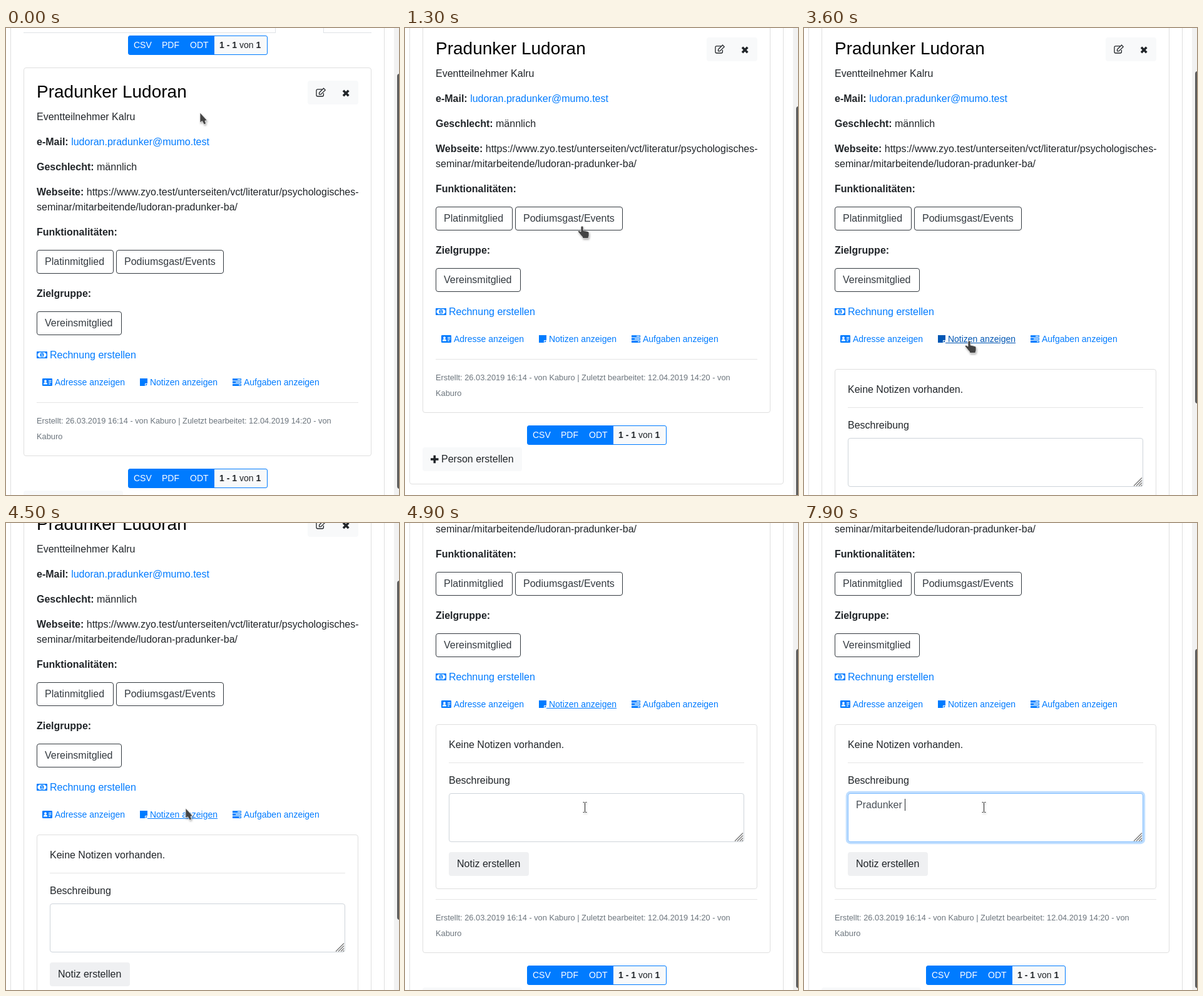
An HTML page that plays this animation: 628 by 745 pixels, repeating every 8 s.

```html
<!DOCTYPE html>
<html lang="de">
<head>
<meta charset="utf-8">
<title>Notiz erstellen</title>
<style>
html, body { margin: 0; width: 100%; height: 100%; overflow: hidden; background: #fff; }
#stage { position: absolute; left: 0; top: 0; width: 628px; height: 745px; overflow: hidden;
  font: 16px/24px "Liberation Sans", Arial, sans-serif; color: #212529; }
#stage div { position: absolute; box-sizing: border-box; }
svg { position: absolute; left: 0; top: 0; width: 1px; height: 1px; overflow: visible; }
.t { white-space: pre; }
.h { font-size: 28px; line-height: 33px; color: #000; }
.s { font-size: 14px; line-height: 21px; }
.a { color: #007bff; }
.w { color: #fff; }
.m { color: #6c757d; }
.m small { font-size: 12.8px; }
.card { border: 1px solid #dfdfdf; border-radius: 4px; }
.line { background: #e5e5e5; }
.tab { background: #dee2e6; }
.btn { border: 1px solid #343a40; border-radius: 4px; color: #343a40; padding: 6px 12px; white-space: pre; }
.light { background: #f8f9fa; border-radius: 4px; }
.grey { background: #eff0f2; border-radius: 4px; }
.pill { border: 1px solid #007bff; border-radius: 3px; background: linear-gradient(90deg, #007bff 137px, #f8f9fa 137px); }
#clip { overflow: hidden; left: 49px; top: 597px; width: 514px; }
#field { border: 1px solid #ced4da; border-radius: 4px; background: #fff; }
#typed { color: #495057; }
#caret { width: 1px; height: 19px; background: #212529; }
#track { left: 620px; top: 0; width: 8px; height: 745px; background: #f1f1f1; }
#thumb { left: 625px; width: 8px; border-radius: 4px; background: #5c5c5c; }
#pointer { filter: drop-shadow(1px 2px 1.5px rgba(0,0,0,.3)); }
</style>
</head>
<body>
<div id="stage"></div>
<script>
const $ = id => document.getElementById(id);
const box = (x, y, w, h, cls, id = '', inner = '') =>
  `<div id="${id}" class="${cls}" style="left:${x}px;top:${y}px;width:${w}px;height:${h}px">${inner}</div>`;
const text = (x, y, str, cls = '', id = '') =>
  `<div id="${id}" class="t ${cls}" style="left:${x}px;top:${y}px">${str}</div>`;

const pager = y => box(195, y, 223, 31, 'pill') +
  text(204, y + 5, 'CSV', 's w') + text(249, y + 5, 'PDF', 's w') + text(294, y + 5, 'ODT', 's w') +
  text(341, y + 5, '<b>1 - 1</b> von <b>1</b>', 's');

const bar = (y, x) => `<path d="M362 ${y}h14v3.2h-14z"/><path fill="#fff" d="M${x} ${y + 1}h${375 - x}v1.2h-${375 - x}z"/>`;

const icons = `<svg fill="#007bff">
<g fill="#f8f9fa" stroke="#212529" stroke-width="1.3">
<path d="M505 97.8h-7a2 2 0 0 0-2 2v7.2a2 2 0 0 0 2 2h7.4a2 2 0 0 0 2-2v-3"/>
<path d="M500.5 105.8v-2.6l7-7 2.7 2.7-7 7z"/>
<path stroke-width="3.6" d="M539 99.8l8.4 8.4M547.4 99.8l-8.4 8.4"/></g>
<rect x="49" y="516" width="17" height="11" rx=".8"/>
<path fill="#fff" d="M52.5 517.4h10a2 2 0 0 0 2 2v4.2a2 2 0 0 0-2 2h-10a2 2 0 0 0-2-2v-4.2a2 2 0 0 0 2-2z"/>
<ellipse cx="57.5" cy="521.5" rx="2.9" ry="3.6"/>
<path fill="none" stroke="#fff" d="M56.3 520.2l1.4-.8v4M56.2 523.6h2.8"/>
<rect x="58" y="559" width="16" height="12" rx="1.3"/>
<g fill="#fff"><circle cx="63" cy="563.2" r="1.9"/><path d="M59.8 568.6c0-2.6 1.2-3.4 3.2-3.4s3.2.8 3.2 3.4z"/>
<path d="M68 562h4.5v1.2h-4.5zM68 564.6h4.5v1.2h-4.5zM68 567.2h3v1.2h-3z"/></g>
<path id="note" d="M214 559h12v8h-4v4h-8zM223 568h3l-3 3z"/>
${bar(559.2, 370)}${bar(563.5, 367)}${bar(567.8, 372)}</svg>`;

const url = 'https://www.zyo.test/unterseiten/vct/literatur/psychologisches-';

const panel = box(0, 0, 514, 263, 'card', 'panel',
  text(20, 20, 'Keine Notizen vorhanden.') +
  box(20, 60, 472, 1, 'line') +
  text(20, 77, 'Beschreibung') +
  box(20, 109, 472, 78, '', 'field',
    text(12, 6, '', '', 'typed') + box(12, 8, 1, 19, '', 'caret') +
    '<svg fill="none" stroke="#777" stroke-width="1.3"><path d="M456 75.5l13-13M460 75.5l9-9M464 75.5l5-5M467.500 75.500l1.500-1.500"/></svg>') +
  box(20, 203, 128, 38, 'grey', '', text(13, 7, 'Notiz erstellen')));

$('stage').innerHTML = `<div id="page">` +
  box(7, -200, 598, 997, 'card', 'outer') +
  box(28, 7, 403, 1, 'tab') + box(507, 7, 77, 1, 'tab') +
  box(430, -40, 1, 47, 'tab') + box(507, -40, 1, 47, 'tab') +
  pager(12) +
  box(28, 63, 556, 620, 'card', 'card') +
  box(482, 84, 81, 38, 'light') +
  text(49, 85, 'Pradunker Ludoran', 'h') +
  text(49, 130, 'Eventteilnehmer Kalru') +
  text(49, 170, '<b>e-Mail:</b> <span class="a">ludoran.pradunker@mumo.test</span>') +
  text(49, 210, '<b>Geschlecht:</b> männlich') +
  text(49, 250, `<b>Webseite:</b> ${url}\nseminar/mitarbeitende/ludoran-pradunker-ba/`) +
  text(49, 314, '<b>Funktionalitäten:</b>') +
  box(49, 354, 123, 38, 'btn', '', 'Platinmitglied') +
  box(176, 354, 172, 38, 'btn', '', 'Podiumsgast/Events') +
  text(49, 412, '<b>Zielgruppe:</b>') +
  box(49, 452, 136, 38, 'btn', '', 'Vereinsmitglied') +
  text(70, 510, 'Rechnung erstellen', 'a') +
  text(78, 555, 'Adresse anzeigen', 's a') +
  text(226, 555, ' Notizen anzeigen', 's a', 'link') +
  text(380, 555, 'Aufgaben anzeigen', 's a') +
  icons +
  `<div id="clip">${panel}</div><div id="low">` +
  box(49, 597, 514, 1, 'line') +
  text(49, 614, '<small>Erstellt: 26.03.2019 16:14 - von Kaburo | Zuletzt bearbeitet: 12.04.2019 14:20 - von</small>\n<small>Kaburo</small>', 'm') +
  pager(703) +
  box(28, 738, 159, 38, 'light', '', text(30, 7, 'Person erstellen')) +
  `<svg fill="#212529"><path d="M41 755.300h4.500v-4.500h3.500v4.500h4.500v3.500h-4.500v4.500h-3.500v-4.500h-4.500z"/></svg>
  </div></div><div id="track"></div><div id="thumb"></div>
  <svg id="pointer"><g id="spot">
  <path id="arrow" fill="#444" stroke="#fff" stroke-width=".7" d="M0 0V16L3.500 13.500 6.500 19 9.500 17.500 8 13 11.500 12.500z"/>
  <path id="hand" fill="#444" stroke="#fff" stroke-width=".7" d="M0 0c1.200 0 2 1 2 2v5l6 1.300c2 .4 3 1.500 3 3.200v3c0 2-1 2.500-1 5h-9c0-2-1.500-3.500-3-5l-4.500-5.500c-.7-1.200 1-2.500 2.500-1.500l2 1.500v-7c0-1 .8-2 2-2z"/>
  <path id="beam" fill="none" stroke="#333" d="M-3-8h2l1 1 1-1h2M0-7V7M-3 8h2l1-1 1 1h2"/>
  </g></svg>`;

const scrollKeys = [[400, 0], [500, 5], [600, 20], [700, 39], [800, 55], [900, 65], [1000, 69],
  [4300, 69], [4400, 78], [4500, 100], [4600, 138], [4700, 181], [4800, 242], [4900, 276]];
const moves = [[600, 1000, -19, 120], [1100, 1300, -8, 61], [1800, 2500, -19, 183], [3800, 4300, 23, -44], [4800, 4900, 1, -1]];
const keyTimes = [6500, 6700, 6800, 7000, 7100, 7300, 7500, 7700, 7800, 7900];

const clamp = u => Math.max(0, Math.min(1, u));
const smooth = u => u * u * (3 - 2 * u);

function lerpKeys(keys, t) {
  let [t0, v0] = keys[0];
  for (const [t1, v1] of keys) {
    if (t < t1) return t1 === t0 ? v0 : v0 + (v1 - v0) * clamp((t - t0) / (t1 - t0));
    [t0, v0] = [t1, v1];
  }
  return v0;
}

// cubic-bezier(.25, .1, .25, 1)
function ease(u) {
  let lo = 0, hi = 1;
  for (let i = 0; i < 20; i++) {
    const p = (lo + hi) / 2, q = 1 - p;
    if (.75 * p * q * q + .75 * p * p * q + p ** 3 < u) lo = p; else hi = p;
  }
  return .3 * lo * (1 - lo) ** 2 + 3 * lo * lo * (1 - lo) + lo ** 3;
}

function opening(t) {
  if (t < 3300) return { height: 0, inset: 0, extra: 0 };
  if (t >= 3700) return { height: 263, inset: 0, extra: 279 };
  const height = Math.round(295 * ease(clamp((t - 3270) / 350)));
  return { height, inset: 16, extra: height + 16 };
}

function draw(time) {
  const t = Math.floor(time / 100) * 100;
  const scroll = Math.round(lerpKeys(scrollKeys, t));
  const { height, inset, extra } = opening(t);
  $('page').style.transform = `translateY(${-scroll}px)`;
  $('low').style.transform = `translateY(${extra}px)`;
  $('outer').style.height = 997 + extra + 'px';
  $('card').style.height = 620 + extra + 'px';
  $('clip').style.height = height + 'px';
  $('panel').style.top = inset + 'px';

  const doc = 1247 + extra;
  $('thumb').style.top = Math.round(940 / doc * (308 + scroll) - 159) + 'px';
  $('thumb').style.height = Math.round(825514 / doc) + 'px';

  const hover = t >= 2400 && t < 4000;
  const color = hover ? '#0056b3' : '#007bff';
  $('link').style.color = color;
  $('note').style.fill = color;
  $('link').style.textDecoration = hover || (t >= 3300 && t < 5500) ? 'underline' : 'none';

  const focus = t < 5500 ? 0 : t < 5600 ? .5 : 1;
  $('field').style.borderColor = ['#ced4da', '#a7c9ed', '#80bdff'][focus * 2];
  $('field').style.boxShadow = `0 0 0 ${3.2 * focus}px rgba(0,123,255,${.25 * focus})`;
  $('typed').textContent = 'Pradunker '.slice(0, keyTimes.filter(k => k <= t).length);
  $('caret').style.left = 12 + Math.round($('typed').getBoundingClientRect().width) + 'px';
  $('caret').style.visibility = focus ? 'visible' : 'hidden';

  let x = 310, y = 135;
  for (const [a, b, dx, dy] of moves) {
    const u = smooth(clamp((t - a) / (b - a)));
    x += dx * u;
    y += dy * u;
  }
  const shape = t >= 4900 ? 'beam' : hover || (t >= 1200 && t < 1900) ? 'hand' : 'arrow';
  for (const id of ['arrow', 'hand', 'beam']) $(id).style.display = id === shape ? '' : 'none';
  const half = shape === 'beam' ? .5 : 0;
  $('spot').setAttribute('transform', `translate(${Math.round(x) - half} ${Math.round(y) - half})`);
}

const start = performance.now();
function tick() {
  draw((performance.now() - start) % 8000);
  requestAnimationFrame(tick);
}
tick();
</script>
</body>
</html>
```
